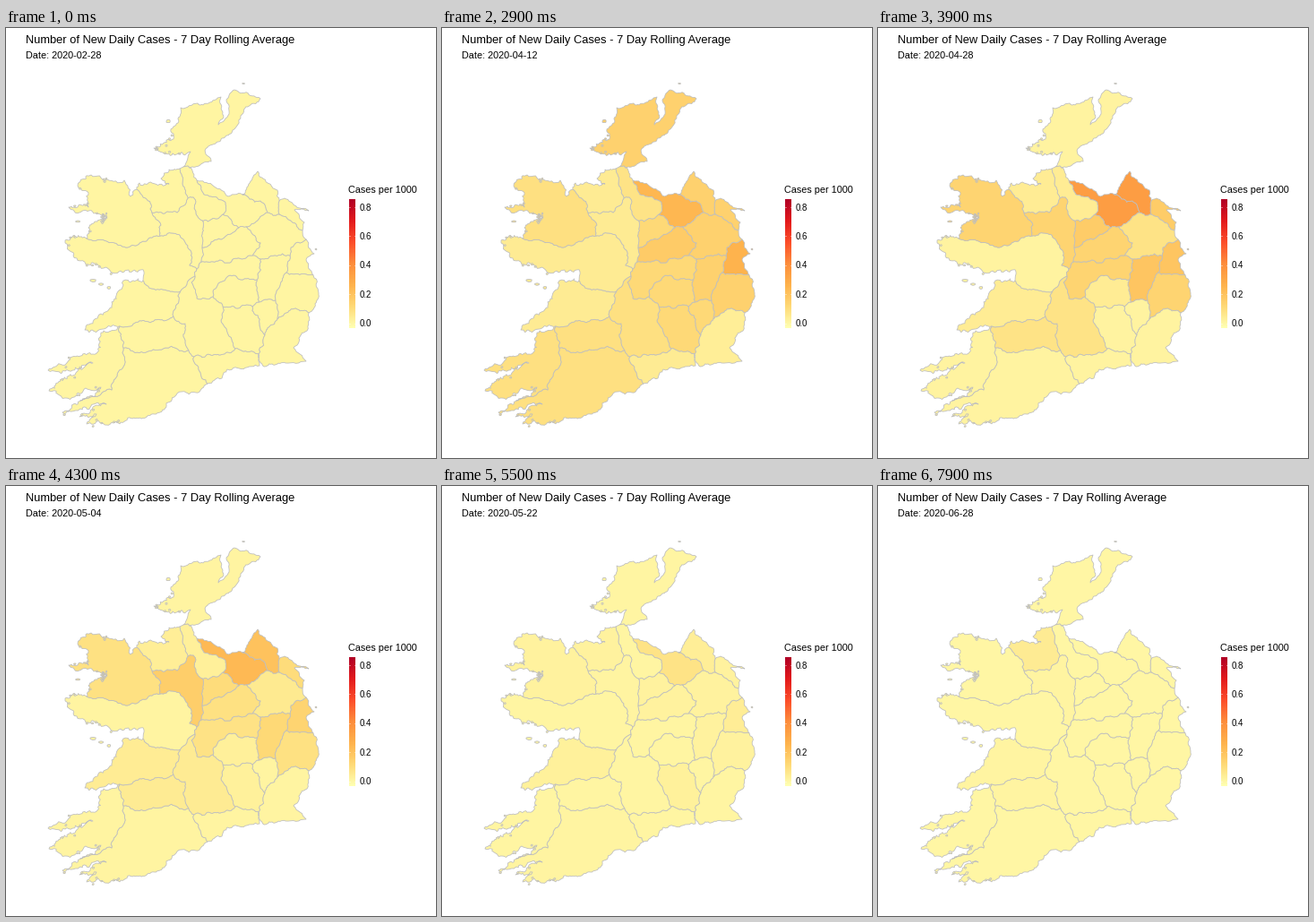
A matplotlib script that plays this animation: 480 px wide and 480 px high, repeating every 8 s.

```python
import itertools

import numpy as np
import matplotlib.pyplot as plt
from matplotlib.animation import FuncAnimation
from matplotlib.colors import LinearSegmentedColormap, Normalize
from matplotlib.patches import Polygon

SIZE, DPI, FRAMES, STEP = 480, 72, 80, 100
SEA, NORTH = "~", "#"
plt.rcParams["font.family"] = "Liberation Sans"
rng = np.random.default_rng(7)

cmap = LinearSegmentedColormap.from_list("heat", [
    "#ffffb2", "#fed976", "#feb24c", "#fd8d3c", "#fc4e2a", "#e31a1c", "#b10026"])
norm = Normalize(-0.034, 0.855)

# Corners of the map, each named by the areas that meet there. Two corners
# with the same pair of areas are the ends of the border between them.
corners = {
    "DL ~ #": (262, 98), "DL LM ~": (198, 155), "LM SO ~": (194, 157),
    "SO MO ~": (146, 180), "MO GY ~": (90, 235), "GY CE ~": (153, 282),
    "CE LK KY ~": (127, 333), "KY CK ~": (83, 416), "CK WD ~": (225, 397),
    "KK WD WX ~": (282, 364), "WW WX ~": (338, 318), "D WW ~": (343, 276),
    "MH D ~": (335, 236), "LH MH ~": (331, 226), "LH ~ #": (311, 190),
    "LH MN #": (305, 193), "MN CN #": (264, 186), "CN LM #": (213, 170),
    "DL LM #": (203, 154),
    "MO SO RN": (163, 206), "SO RN LM": (203, 190), "MO RN GY": (172, 232),
    "RN LM LD": (219, 215), "RN LD WH": (219, 245), "RN WH OY": (218, 261),
    "RN GY OY": (213, 269), "GY OY TA": (211, 277), "GY CE TA": (196, 292),
    "CE TA LK": (187, 322), "LK KY CK": (131, 357), "LK TA CK": (204, 360),
    "TA CK WD": (210, 367), "TA WD KK": (256, 358), "TA KK LS": (242, 311),
    "TA LS OY": (231, 300), "KK CW LS": (275, 311), "KK WX CW": (289, 343),
    "WX WW CW": (303, 325), "CW WW KE": (301, 304), "CW LS KE": (282, 306),
    "LS OY KE": (280, 281), "OY KE MH": (284, 258), "OY MH WH": (275, 254),
    "MH WH CN": (268, 222), "WH LD CN": (260, 223), "LD CN LM": (242, 208),
    "CN MN MH": (292, 206), "MN LH MH": (305, 208), "MH D KE": (317, 254),
    "D KE WW": (313, 273),
}

# Capes, bays and the strongest bends between two corners
bends = {
    "DL ~": [(284, 79), (255, 69), (246, 80), (249, 96), (237, 108), (242, 94), (240, 77),
             (226, 84), (214, 84), (195, 89), (187, 110), (187, 124), (165, 134),
             (186, 140), (206, 138)],
    "SO ~": [(182, 158), (173, 168), (182, 174), (149, 173)],
    "MO ~": [(139, 188), (132, 170), (95, 164), (80, 176), (92, 184), (92, 200),
             (70, 200), (98, 207), (113, 212), (92, 223)],
    "GY ~": [(66, 237), (75, 254), (92, 264), (126, 272), (154, 272)],
    "CE ~": [(131, 282), (123, 299), (111, 317), (88, 337)],
    "KY ~": [(109, 338), (102, 362), (74, 367), (47, 382), (66, 383), (97, 374),
             (58, 396), (48, 405), (66, 413), (106, 401)],
    "CK ~": [(63, 429), (112, 420), (82, 434), (101, 431), (90, 442), (120, 441),
             (172, 429), (191, 408), (212, 407)],
    "WD ~": [(241, 391), (247, 381), (283, 377)],
    "WX ~": [(288, 378), (312, 374), (335, 372), (321, 357), (336, 338)],
    "WW ~": [(349, 296)],
    "D ~": [(335, 259), (344, 252)],
    "LH ~": [(333, 217), (322, 203), (338, 204)],
    "MN #": [(303, 181), (292, 173), (281, 160), (272, 173)],
    "CN #": [(246, 187), (230, 175)],
    "DL #": [(252, 117), (231, 130), (222, 137), (229, 149)],
    "MO GY": [(130, 244), (145, 243)],
    "RN GY": [(186, 229), (203, 243), (205, 265)],
    "SO MO": [(157, 191)],
    "SO RN": [(191, 206)],
    "MO RN": [(173, 220)],
    "RN LM": [(209, 189), (211, 203)],
    "GY CE": [(163, 291)],
    "KY CK": [(118, 404), (131, 378)],
    "LK CK": [(142, 361), (178, 357)],
    "LK TA": [(200, 330), (198, 342)],
    "TA OY": [(207, 284), (213, 302)],
    "LS OY": [(237, 285), (250, 276)],
    "WH OY": [(248, 262)],
    "MH WH": [(284, 240)],
    "LM CN": [(221, 186), (245, 195)],
    "CN MN": [(272, 191), (284, 193)],
    "MH D": [(318, 245)],
    "WW WX": [(325, 314)],
    "KK CW": [(283, 325)],
    "TA KK": [(240, 326)],
}
bends = {frozenset(k.split()): v for k, v in bends.items()}


def crinkle(a, b, amp):
    """Midpoint displacement from a to b, without the end point b."""
    d = b - a
    length = np.hypot(*d)
    if length < 3:
        return [a]
    normal = np.array([-d[1], d[0]]) / length
    mid = (a + b) / 2 + normal * rng.uniform(-1, 1) * min(amp * length, 2.5)
    return crinkle(a, mid, amp) + crinkle(mid, b, amp)


def border(pair):
    """Rough line between the two corners that share this pair of areas."""
    ends = [p for key, p in corners.items() if pair <= set(key.split())]
    if len(ends) < 2:
        return None
    pts = np.array([ends[0], *bends.get(pair, []), ends[1]], float)
    out = []
    for a, b in zip(pts[:-1], pts[1:]):
        wild = SEA in pair and a[0] < 200
        out += crinkle(a, b, 0.36 if wild else 0.2)
    return out + [pts[-1]]


areas = sorted({c for key in corners for c in key.split()})
codes = [c for c in areas if c not in (SEA, NORTH)]
borders = {}
for pair in map(frozenset, itertools.combinations(areas, 2)):
    path = border(pair) if pair != {SEA, NORTH} else None
    if path:
        borders[pair] = path


def ring(code):
    """Chain all borders of a county into one closed outline."""
    parts = [path for pair, path in borders.items() if code in pair]
    out = list(parts.pop(0))
    while parts:
        i = next(i for i, p in enumerate(parts)
                 if any(np.allclose(q, out[-1]) for q in (p[0], p[-1])))
        p = parts.pop(i)
        out += p[1:] if np.allclose(p[0], out[-1]) else p[-2::-1]
    return np.array(out)


def island(x, y, w, h):
    t = np.arange(0, 2 * np.pi, 0.8)
    r = rng.uniform(0.35, 0.55, t.size)
    return np.c_[x + w * r * np.cos(t), y + h * r * np.sin(t)]


outlines = [(c, ring(c)) for c in codes]
outlines += [("DL", island(265, 62, 3, 1)), ("DL", island(181, 104, 5, 4)),
             ("MO", island(80, 216, 5, 2)), ("D", island(346, 247, 2, 2))]
outlines += [("GY", island(97 + 9 * i, 282 + 4 * i, 8 - 2 * i, 3)) for i in range(3)]
outlines += [("MO", island(*p, 2, 2)) for p in rng.normal((109, 213), (2, 3), (18, 2))]
# Skerries along the ragged western shores
for c in ("DL", "MO", "GY", "KY", "CK"):
    shore = [p for p in borders[frozenset((c, SEA))] if p[0] < 130 or c == "DL" and p[0] < 195]
    for i in rng.choice(len(shore), 9, replace=False):
        outlines.append((c, island(*shore[i] + rng.normal(0, 1.5, 2), 2.5, 2)))

# Cases per 1000 at a few moments: a base level and the counties away from it
moments = {
    0: (0.005, {}),
    9: (0.008, {}),
    18: (0.018, {0.115: "D", 0.083: "WH", 0.055: "WW", 0.0: "WX",
                 0.035: "MH KE KY CK GY TA CE LK KK WD"}),
    29: (0.09, {0.26: "D", 0.245: "CN", 0.17: "WH", 0.145: "DL MN LH MH KE WW",
                0.115: "LD OY LS KK CW", 0.045: "SO RN GY CE WD", 0.035: "WX",
                0.075: "LM"}),
    39: (0.012, {0.345: "CN MN", 0.19: "KE D", 0.165: "LH LD",
                 0.135: "WH OY RN MO WW", 0.075: "MH LK TA", 0.04: "CE LM SO LS"}),
    48: (0.008, {0.19: "RN", 0.1: "CN", 0.062: "D", 0.04: "CE KK",
                 0.025: "MN KE MH WH LH MO LD WW SO"}),
    64: (0.004, {0.045: "CN MN", 0.012: "CK"}),
    79: (0.004, {0.045: "SO"}),
}
# A single day's batch stays in the weekly mean and then leaves it at once
batches = {"CE": (60, 65, 0.06), "LK": (60, 65, -0.03), "RN": (46, 50, 0.19)}


def level(code, base, groups):
    return next((v for v, names in groups.items() if code in names.split()), base)


curves = {c: [level(c, *m) for m in moments.values()] for c in codes}


def cases(code, f):
    first, last, value = batches.get(code, (FRAMES, FRAMES, 0))
    if first <= f <= last:
        return value
    if f > last:
        return 0.008
    return np.interp(f, list(moments), curves[code])


fig = plt.figure(figsize=(SIZE / DPI, SIZE / DPI), dpi=DPI, facecolor="white")
ax = fig.add_axes([0, 0, 1, 1])
ax.axis("off")

shapes = []
for code, pts in outlines:
    patch = Polygon(pts, ec="#bebebe", lw=0.8, joinstyle="round")
    ax.add_patch(patch)
    shapes.append((code, patch))

ax.text(22, 17, "Number of New Daily Cases - 7 Day Rolling Average", size=12.87)
date = ax.text(22, 34, "", size=10.9)
ax.text(382, 184, "Cases per 1000", size=10.9)

ax.imshow(np.linspace(1, 0, 144)[:, None], cmap=cmap, extent=(383, 390, 335, 191),
          aspect="auto", interpolation="nearest")
for v in np.arange(0, 1, 0.2):
    y = 329.5 - 161.9 * v
    for x in (383, 388.6):
        ax.plot([x, x + 1.4], [y, y], color="white", lw=0.8, solid_capstyle="butt")
    ax.text(395, y + 3.6, f"{v:.1f}", size=9.8)
ax.set_xlim(0, SIZE)
ax.set_ylim(SIZE, 0)


def draw(f):
    date.set_text(f"Date: {np.datetime64('2020-02-28') + int(1.543 * f)}")
    for code, patch in shapes:
        patch.set_facecolor(cmap(norm(cases(code, f))))
    return [date] + [p for _, p in shapes]


anim = FuncAnimation(fig, draw, frames=FRAMES, interval=STEP, repeat=True, repeat_delay=0)
plt.show()
```
